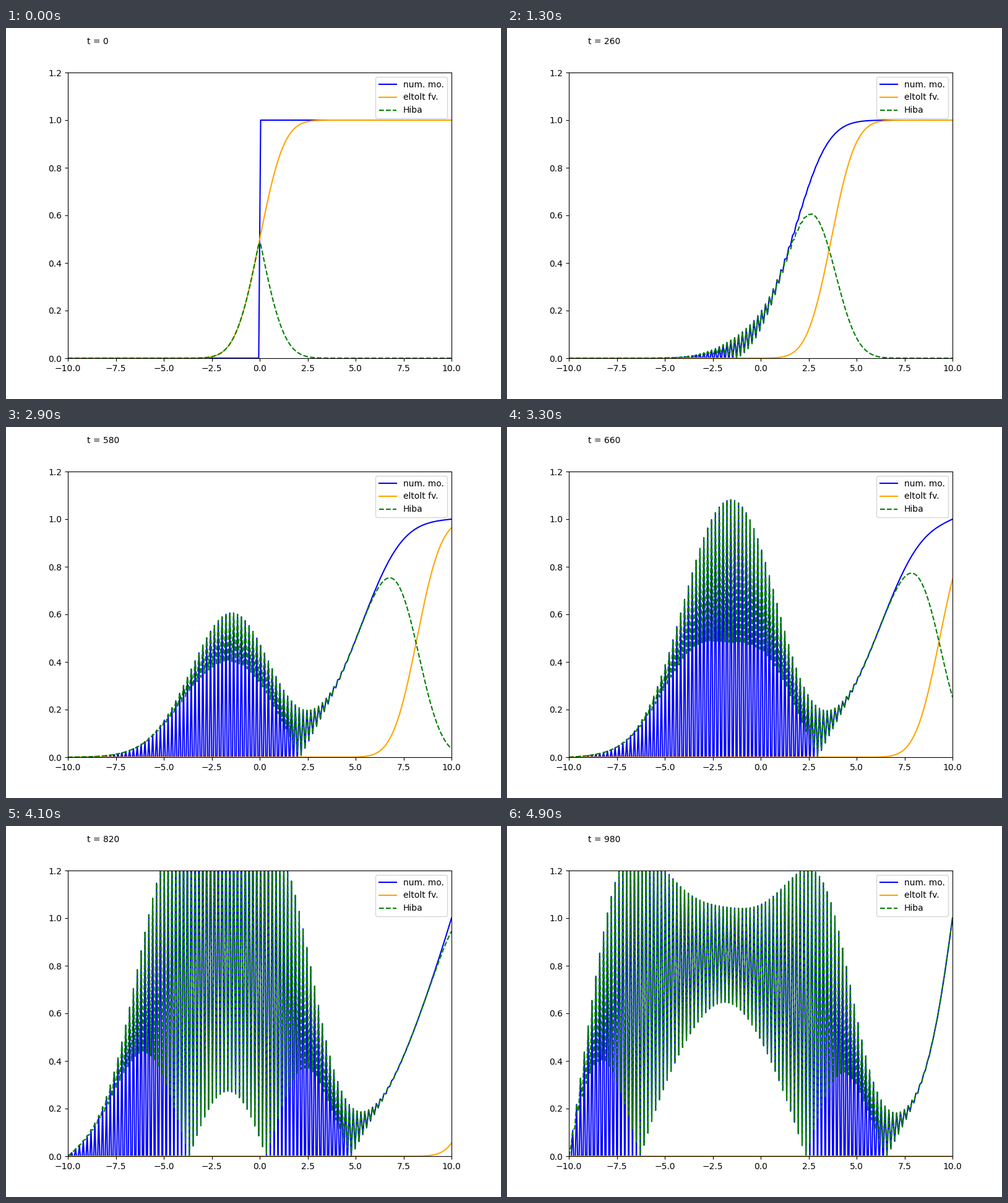
A matplotlib script that plays this animation: 800 px wide and 600 px high, repeating every 5000 ms.

```python
import math

import matplotlib.pyplot as plt
import numpy as np
from matplotlib.animation import FuncAnimation

FRAMES = 50
STEPS_PER_FRAME = 20
DT = 0.01
DX = 0.1
SPEED = math.sqrt(2)

x = np.linspace(-10, 10, 200)
erf = np.vectorize(math.erf)


def shifted_profile(step):
    """Normal distribution function travelling at constant speed."""
    return 0.5 * (1 + erf((x - SPEED * step * DT) / math.sqrt(2)))


def advance(u):
    """Explicit step of u_t = u_xx / 2 + u^2 - u with fixed end values."""
    new = u.copy()
    mid = u[1:-1]
    diffusion = 0.5 * (u[2:] - 2 * mid + u[:-2]) / DX**2
    new[1:-1] = mid + DT * (diffusion + mid**2 - mid)
    return new


def solve():
    u = np.where(x > 0, 1.0, 0.0)
    snapshots = []
    for _ in range(FRAMES):
        snapshots.append(u)
        for _ in range(STEPS_PER_FRAME):
            u = advance(u)
    return snapshots


solution = solve()

plt.rcParams["font.family"] = "DejaVu Sans"
fig, ax = plt.subplots(figsize=(8, 6), dpi=100)
ax.set_xlim(-10, 10)
ax.set_ylim(0, 1.2)

numeric, = ax.plot([], [], color="blue", label="num. mo.")
shifted, = ax.plot([], [], color="orange", label="eltolt fv.")
error, = ax.plot([], [], color="green", linestyle="--", label="Hiba")
label = ax.text(-9, 1.32, "")
ax.legend(loc="upper right")


def draw(frame):
    step = frame * STEPS_PER_FRAME
    u = solution[frame]
    profile = shifted_profile(step)
    numeric.set_data(x, u)
    shifted.set_data(x, profile)
    error.set_data(x, np.abs(u - profile))
    label.set_text(f"t = {step}")
    return numeric, shifted, error, label


anim = FuncAnimation(fig, draw, frames=FRAMES, interval=100, repeat=True, repeat_delay=0)
plt.show()
```
